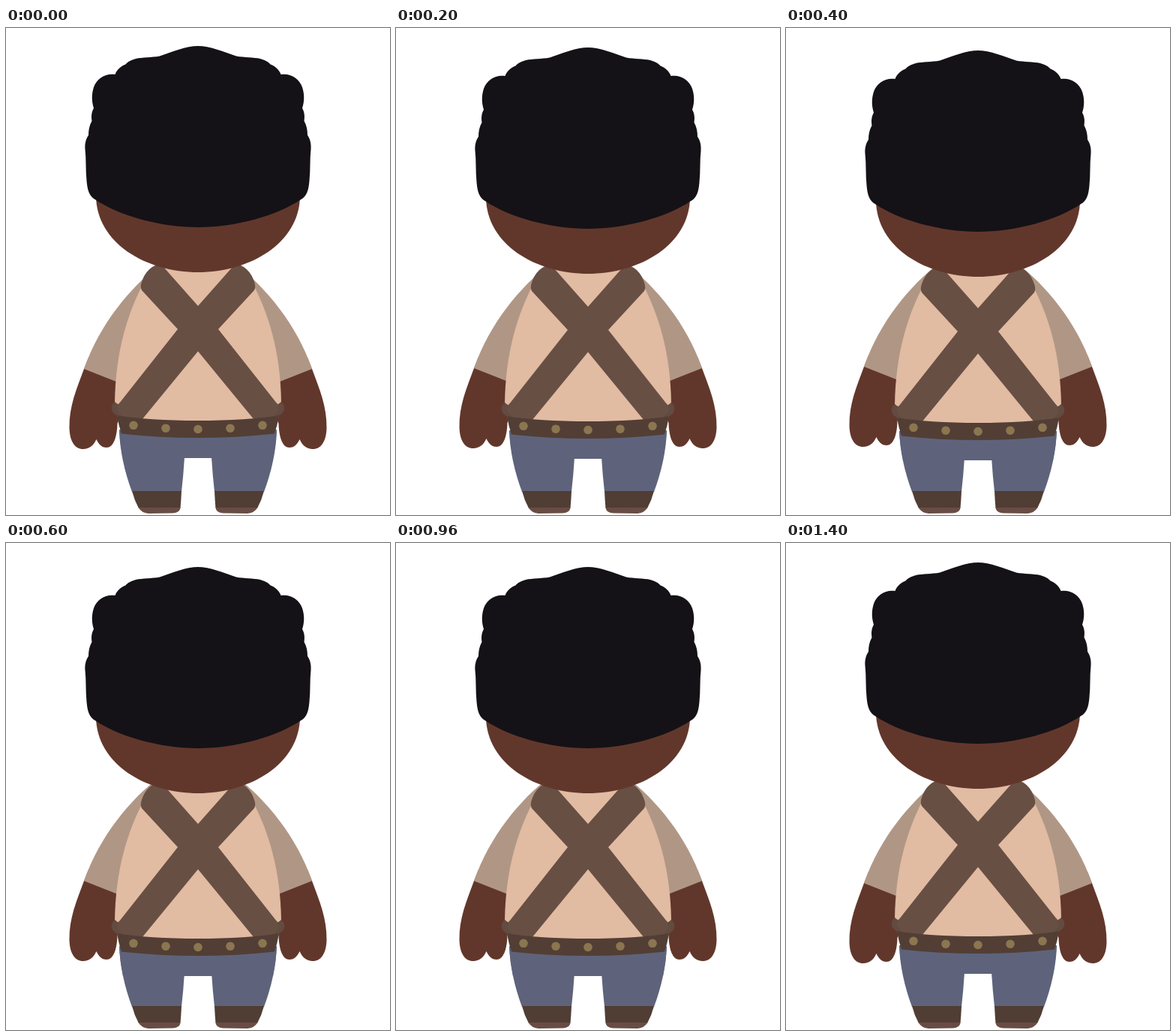
An HTML page with a canvas that plays this animation: 512x650 px, repeating every 1600 ms.

```html
<!DOCTYPE html>
<html lang="en">
<head>
<meta charset="utf-8">
<title>Idle breathing</title>
<style>
  html, body { margin: 0; width: 100%; height: 100%; overflow: hidden; background: #fff; }
  canvas { display: block; }
</style>
</head>
<body>
<canvas id="stage" width="512" height="650"></canvas>
<script>
const ctx = document.getElementById('stage').getContext('2d');
const STEP = 200, STEPS = 8;

const skin = '#62372b', denim = '#5e637b';
const color = {
  hair: '#141217', face: skin, hand: skin, sleeve: '#b09785', shirt: '#e1bba2',
  strap: '#684f43', hem: '#624b40', belt: '#523e35', rivet: '#8b7650',
  leg: denim, hip: denim, boot: '#503d33', sole: '#694c43'
};

// Left half of each part; the right half is its mirror image.
const part = {
  hair: `M257,24 C239,24 222,32 205,37.5 C194,39.5 182,39 173,41 C167,43 162,45 159.5,48.5
    C153,51 147.5,56 145.5,62 C133,60 121,67 117,79 C114,88 114,98 117,107
    C114,112 113.5,118 114.5,124 C111,130 110,137 110,143 C106,149 105,155 105.5,162
    C107,175 106,190 107.5,204 C108.5,216 111,225 119,229 C150,250 205,266 257,266 Z`,
  face: 'M257,200 L120,200 L120,225 C121,286 185,326 257,326 Z',
  hand: `M150,440 L110,440 L104,455 C94,482 84,505 84.5,534 C85,552 92,562 103,562
    C111,562 117,557 120.5,549 C124,557 129,560 134,560 C143,560 148,547 148.5,528 L160,500 Z`,
  sleeve: 'M215,316 L205,316 C165,347 125,395 104,455 L147,472 L175,472 L215,350 Z',
  shirt: 'M257,300 L212,312 L190,330 L182,343 C163,380 146,430 145,500 L150,525 L257,532 Z',
  strap: `M181,350 Q178,345 182,336 Q186,325 195,319 Q203,314 210.5,319.5 L256,371 L283,402
    L359.5,499 Q365,504 363,511 L354,522 L331,523 L256,431.5 L229,402 Z`,
  hem: 'M145.5,499 C140,502 140,508 142,512 C145,517 151,518 156,522 L172,523 L174,512 L156,503 Q148,503 145.5,499 Z',
  belt: 'M148,517 Q190,524 257,524 L257,547 Q205,547 154,541.5 Q150,530 148,517 Z',
  leg: 'M151,538 C152,565 158,592 168,619 L234,619 Q236.5,597 238,573 L238,538 Z',
  hip: 'M151,536 Q152,555 156,574 L257,574 L257,536 Z',
  boot: 'M168,618 L234,618 Q233.5,630 232.5,641 L177,641 Q171,630 168,618 Z',
  sole: 'M176.5,640 L232.5,640 Q232,647 223,647.5 L190,648 Q181,647.5 176.5,640 Z'
};
for (const name in part) part[name] = new Path2D(part[name]);

function pair(name, dy = 0) {
  ctx.fillStyle = color[name];
  for (const side of [1, -1]) {
    ctx.setTransform(side, 0, 0, 1, side > 0 ? 0 : 512, dy);
    ctx.fill(part[name]);
  }
}

function rivets(dy) {
  ctx.setTransform(1, 0, 0, 1, 256, dy);
  ctx.fillStyle = color.rivet;
  for (let i = -2; i <= 2; i++) {
    ctx.beginPath();
    ctx.arc(i * 43, 535.5 - i * i * 1.3, 5.8, 0, Math.PI * 2);
    ctx.fill();
  }
}

function draw(t) {
  const step = Math.floor(t / STEP) % STEPS;
  const phase = Math.min(step, 3, STEPS - step);
  const sink = Math.round(2 * (1 - Math.cos(phase * Math.PI / 3)));

  ctx.setTransform(1, 0, 0, 1, 0, 0);
  ctx.fillStyle = '#fff';
  ctx.fillRect(0, 0, 512, 650);

  // Arms rise while the torso sinks and the head sinks twice as far.
  pair('hand', -sink);
  pair('sleeve', -sink);
  ['leg', 'boot', 'sole'].forEach(name => pair(name));
  ['hip', 'shirt', 'hem', 'strap', 'belt'].forEach(name => pair(name, sink));
  rivets(sink);
  pair('face', sink * 2);
  pair('hair', sink * 2);
}

const start = performance.now();
function tick() {
  draw(performance.now() - start);
  requestAnimationFrame(tick);
}
tick();
</script>
</body>
</html>
```
